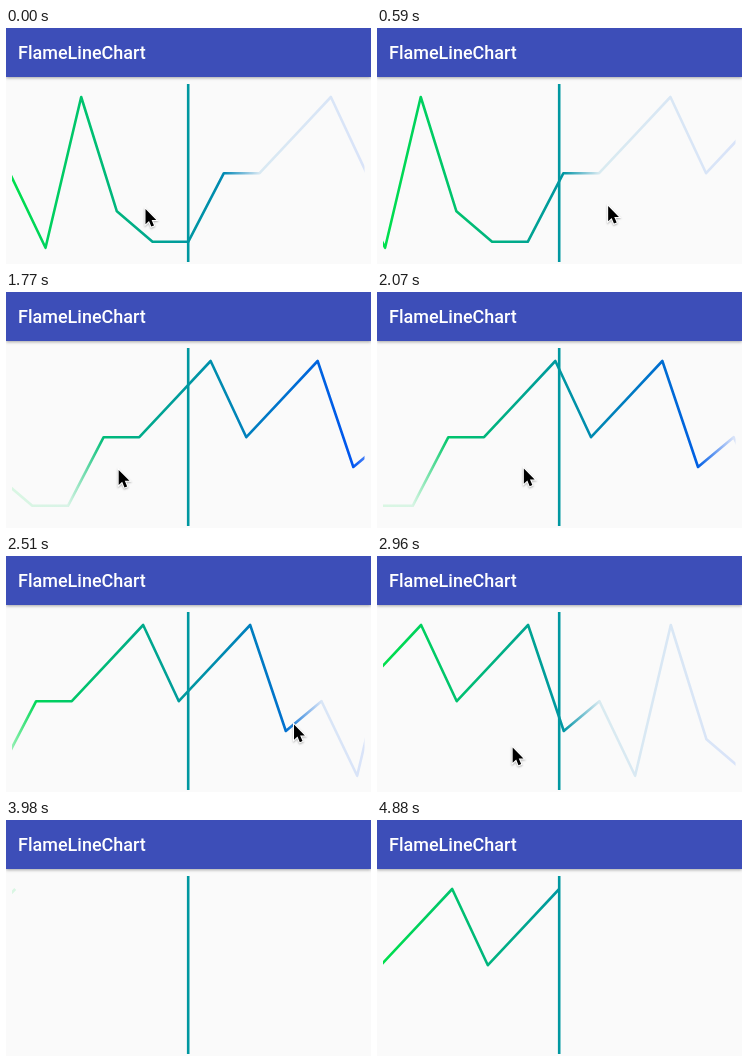
An HTML page with a canvas that plays this animation: 365 px wide and 236 px high, repeating every 5.33 s.

```html
<!DOCTYPE html>
<html lang="en">
<head>
<meta charset="utf-8">
<title>FlameLineChart</title>
<style>
  html, body { margin: 0; width: 100%; height: 100%; overflow: hidden; background: #fafafa; }
  header {
    position: absolute; left: 0; top: 0; width: 365px; height: 49px;
    background: #3d4eb8; box-shadow: 0 1px 3px rgba(0, 0, 0, .35);
    color: #fff; font: 500 18px/49px Roboto, sans-serif;
  }
  header span { position: absolute; left: 12px; top: 0; white-space: nowrap; }
  canvas { position: absolute; left: 0; top: 0; width: 365px; height: 236px; }
</style>
</head>
<body>
<header><span>FlameLineChart</span></header>
<canvas id="chart"></canvas>
<script>
const W = 365, H = 236, LOOP = 5330;
const STEP = 147.5, LAST_STEP = 33;      // the screen refreshes in coarse steps
const LEFT = 6, RIGHT = 358.5, MID = 182.2, GAP = 35.67;
const PAGE = 7, PAGE_START = 5, FAINT = 0.13, END = 25;
const GREEN = [0, 224, 76], BLUE = [0, 80, 245];

// Heights repeat every 14 points
const heights = [219.8, 69, 183.3, 213.8, 213.8, 145.2, 145.2, 107.1, 69, 145.2, 107.1, 69, 175, 145.2];

const linear = p => p;
const easeIn = p => p ** 1.6;
const easeInOut = p => p * p * (3 - 2 * p);

// [time, values, easing used to arrive there]
const scrollKeys = [
  [0, [4]], [300, [4]], [890, [5.8], easeInOut], [1030, [5.8]],
  [1180, [5.895]], [2070, [8.118]], [2510, [9.267]],
  [3250, [15.23], easeIn], [3980, [29.85]], [4868, [25], easeInOut]
];
const pointerKeys = [
  [0, [139.5, 181]], [300, [275, 178], easeInOut], [890, [185.5, 178], easeInOut],
  [1180, [185.5, 178]], [1700, [110, 178], easeInOut], [2070, [147.5, 176.5], easeIn],
  [2510, [288.5, 168.5]], [3250, [50.5, 204.5], easeInOut], [3540, [-30, 210]]
];

function at(keys, t) {
  const i = keys.findIndex(k => k[0] > t);
  if (i < 0) return keys[keys.length - 1][1];
  const [t0, a] = keys[i - 1], [t1, b, ease = linear] = keys[i];
  const p = ease((t - t0) / (t1 - t0));
  return a.map((v, j) => v + (b[j] - v) * p);
}

const canvas = document.getElementById('chart');
const ctx = canvas.getContext('2d');
const ratio = window.devicePixelRatio || 1;
canvas.width = W * ratio;
canvas.height = H * ratio;
ctx.scale(ratio, ratio);

const arrow = new Path2D('M0 0V15.2L3.5 11.9L5.8 17.6L8.5 16.5L6.1 10.9H10.8Z');

function flame(centre) {
  const xOf = i => MID + (i - centre) * GAP;
  const first = PAGE_START + Math.floor((centre - PAGE_START) / PAGE) * PAGE;
  const edges = [xOf(first - 1), xOf(first), xOf(first + PAGE), xOf(first + PAGE + 1)];
  const alpha = x => {
    const rise = Math.min((x - edges[0]) / GAP, (edges[3] - x) / GAP);
    return FAINT + (1 - FAINT) * Math.max(0, Math.min(1, rise));
  };
  const grad = ctx.createLinearGradient(LEFT, 0, RIGHT, 0);
  for (const x of [LEFT, ...edges, RIGHT]) {
    if (x < LEFT || x > RIGHT) continue;
    const p = (x - LEFT) / (RIGHT - LEFT);
    const rgb = GREEN.map((v, j) => Math.round(v + (BLUE[j] - v) * p));
    grad.addColorStop(p, `rgba(${rgb}, ${alpha(x)})`);
  }
  return grad;
}

function drawLine(centre) {
  ctx.save();
  ctx.beginPath();
  ctx.rect(LEFT, 50, RIGHT - LEFT, H - 50);
  ctx.clip();
  ctx.beginPath();
  const from = Math.floor(centre) - 6, to = Math.min(END, from + 13);
  for (let i = from; i <= to; i++) {
    const n = heights.length;
    ctx.lineTo(MID + (i - centre) * GAP, heights[(i % n + n) % n]);
  }
  ctx.strokeStyle = flame(centre);
  ctx.lineWidth = 2.6;
  ctx.lineJoin = 'round';
  ctx.stroke();
  ctx.restore();
}

function drawPointer(x, y) {
  ctx.save();
  ctx.translate(x, y);
  ctx.shadowColor = 'rgba(0, 0, 0, .3)';
  ctx.shadowBlur = 2 * ratio;
  ctx.shadowOffsetY = ratio;
  ctx.strokeStyle = '#fff';
  ctx.lineWidth = 2;
  ctx.stroke(arrow);
  ctx.shadowColor = 'transparent';
  ctx.fillStyle = '#000';
  ctx.fill(arrow);
  ctx.restore();
}

let start;
function tick(now) {
  start ??= now;
  const step = Math.min(LAST_STEP, Math.floor(((now - start) % LOOP + 3) / STEP));
  const t = step * STEP + 1;
  ctx.clearRect(0, 0, W, H);
  drawLine(at(scrollKeys, t)[0]);
  ctx.fillStyle = '#0097a0';
  ctx.fillRect(MID - 1.3, 56, 2.6, 178);
  const [x, y] = at(pointerKeys, t);
  if (x > -15) drawPointer(x, y);
  requestAnimationFrame(tick);
}
requestAnimationFrame(tick);
</script>
</body>
</html>
```
